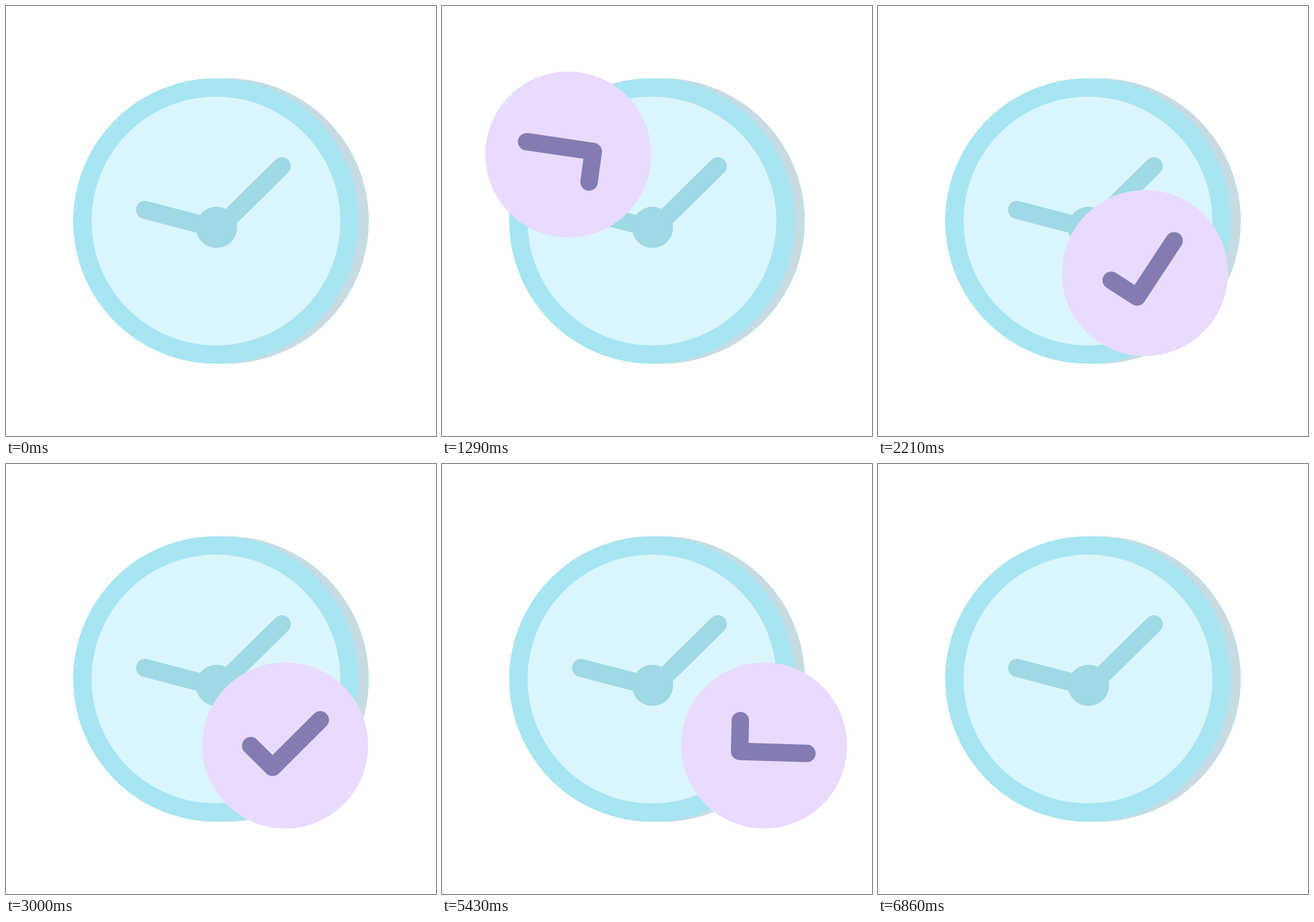
Animation of 640x640 px, one loop 7210 ms. Source, as an HTML page:

```html
<!DOCTYPE html>
<html lang="en">
<head>
<meta charset="utf-8">
<title>Clock with rolling check badge</title>
<style>
  html, body { margin: 0; width: 100%; height: 100%; overflow: hidden; background: #fff; }
  svg { display: block; width: 100vw; height: 100vh; }
</style>
</head>
<body>
<svg viewBox="0 0 640 640">
  <circle cx="327.5" cy="320" r="212.5" fill="#c6dce2"/>
  <circle cx="312.5" cy="320" r="212.5" fill="#a7e5f2"/>
  <circle cx="312.5" cy="320" r="185.2" fill="#dbf5fc"/>
  <g fill="none" stroke="#9fd9e5" stroke-width="27" stroke-linecap="round">
    <path d="M207 303.5L313 331.3M410.5 238.5L313 334.5"/>
  </g>
  <circle cx="313.3" cy="329.5" r="30.7" fill="#9fd9e5"/>
  <g id="badge">
    <circle r="123.6" fill="#e8dbfe"/>
    <path d="M-51.3 .3L-18.7 32.5L52.3 -38.2" fill="none" stroke="#827cb1"
      stroke-width="26" stroke-linecap="round" stroke-linejoin="round"/>
  </g>
</svg>
<script>
  const LOOP = 7210, STEP = LOOP / 101;
  const REST = { x: 415.5, y: 419 };
  const badge = document.getElementById('badge');

  // Keys: time in ms, horizontal offset from rest, speed in px per ms
  const ENTER = [
    [429, -546, .25], [1250, -242.5, .437], [1786, -74.5, .22], [2000, -34, .155],
    [2300, -9, .05], [2700, -.6, .005], [3000, 0, 0]
  ];
  const LEAVE = [
    [4786, 0, 0], [5428, 64.5, .205], [5571, 95, .23], [6286, 255, .14], [6786, 292, .02]
  ];

  // Cubic Hermite curve through the keys
  function follow(keys, t) {
    if (t <= keys[0][0]) return keys[0][1];
    const i = keys.findIndex(k => k[0] > t);
    if (i < 0) return keys[keys.length - 1][1];
    const [t0, x0, v0] = keys[i - 1], [t1, x1, v1] = keys[i];
    const d = t1 - t0, s = (t - t0) / d, r = 1 - s;
    return x0 * r * r * (1 + 2 * s) + x1 * s * s * (3 - 2 * s)
      + d * s * r * (v0 * r - v1 * s);
  }

  function pose(t) {
    if (t > 4000) {
      const dx = follow(LEAVE, t);
      return { dx, dy: 0, turn: dx * .73 };
    }
    const dx = follow(ENTER, t), d = -dx;
    return {
      dx,
      dy: -d * (1.21 - .001571 * d + 3.4e-7 * d * d),
      turn: -d * (.658 - .000516 * d + 3.2e-7 * d * d)
    };
  }

  function draw(ms) {
    const t = Math.floor((ms % LOOP) / STEP) * STEP;
    const shown = t > 430 && t < 6820;
    badge.setAttribute('visibility', shown ? 'visible' : 'hidden');
    const { dx, dy, turn } = pose(t);
    badge.setAttribute('transform',
      `translate(${REST.x + dx} ${REST.y + dy}) rotate(${turn})`);
  }

  const start = performance.now();
  function tick() {
    draw(performance.now() - start);
    requestAnimationFrame(tick);
  }
  tick();
</script>
</body>
</html>
```
